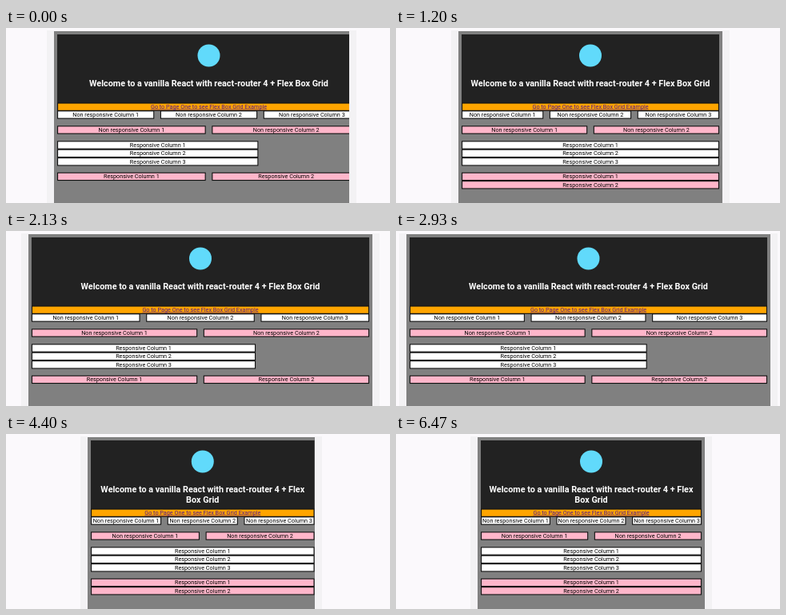
Recreate the animation shown at these times as an HTML page with a canvas. Size 480 by 219 pixels, loop 6.54 s.

```html
<!DOCTYPE html>
<html lang="en">
<head>
<meta charset="utf-8">
<title>Responsive grid</title>
<style>
  html, body { margin: 0; width: 100%; height: 100%; overflow: hidden; background: #fbf9fc; }
  canvas { display: block; width: 480px; height: 219px; }
</style>
</head>
<body>
<canvas id="stage"></canvas>
<script>
const WIDTH = 480, HEIGHT = 219, LOOP = 6540, STEP = 200 / 3;
const PADDING = 4, GAP = 7.6, BREAKPOINT = 346, LAYOUT_DELAY = 60;
const PINK = '#ffb6ca', WHITE = '#fff', INK = '#111';

// Window edges during the drag: [time, left, right]
const drag = [
  [-60, 51, 438], [0, 60, 429], [150, 71, 416], [300, 78, 408],
  [1200, 78, 408], [1470, 63, 422], [1600, 50, 436], [2130, 28, 458],
  [2930, 13, 468], [3350, 9, 472], [3530, 14, 468], [3667, 53, 436],
  [3800, 78, 410], [4130, 94, 394], [4400, 102, 386], [LOOP, 102, 386]
];

const canvas = document.getElementById('stage');
const ctx = canvas.getContext('2d');
const ratio = window.devicePixelRatio || 1;
canvas.width = WIDTH * ratio;
canvas.height = HEIGHT * ratio;
ctx.scale(ratio, ratio);

function edgesAt(time) {
  let i = 1;
  while (i < drag.length - 1 && drag[i][0] < time) i++;
  const [t0, l0, r0] = drag[i - 1], [t1, l1, r1] = drag[i];
  const k = Math.min(1, Math.max(0, (time - t0) / (t1 - t0)));
  return { left: l0 + (l1 - l0) * k, right: r0 + (r1 - r0) * k };
}

function innerWidth({ left, right }) {
  return right - left - 2 * PADDING;
}

function rect(x, y, w, h, color) {
  ctx.fillStyle = color;
  ctx.fillRect(x, y, w, h);
}

function text(label, x, baseline, color, font) {
  ctx.fillStyle = color;
  ctx.font = font || '7.25px Roboto, sans-serif';
  ctx.fillText(label, x, baseline);
}

function box(x, y, w, color, label) {
  rect(x, y, w, 10.4, INK);
  rect(x + 1.1, y + 1.1, w - 2.2, 8.2, color);
  if (label) text(label, x + w / 2, y + 7.5, '#000');
}

function columns(x, y, width, count, color, name) {
  const w = (width - GAP * (count - 1)) / count;
  for (let i = 0; i < count; i++) {
    box(x + i * (w + GAP), y, w, color, `${name} Column ${i + 1}`);
  }
}

function rows(x, y, width, count, color) {
  for (let i = 0; i < count; i++) {
    box(x, y + i * 10.4, width, color, `Responsive Column ${i + 1}`);
  }
}

function header(x, width) {
  const mid = x + width / 2;
  const font = 'bold 10.8px Roboto, sans-serif';
  const title = 'Welcome to a vanilla React with react-router 4 + Flex';
  rect(x, 8, width, 86, '#222');
  ctx.fillStyle = '#61dafb';
  ctx.beginPath();
  ctx.arc(mid, 34.5, 14, 0, Math.PI * 2);
  ctx.fill();
  if (width > 300) {
    text(title + ' Box Grid', mid, 73, WHITE, font);
  } else {
    text(title, mid, 73, WHITE, font);
    text('Box Grid', mid, 85.5, WHITE, font);
  }
}

function link(x, width) {
  const label = 'Go to Page One to see Flex Box Grid Example';
  const mid = x + width / 2;
  box(x, 93.5, width, '#ffa500');
  text(label, mid, 101, '#551a8b');
  const w = ctx.measureText(label).width;
  rect(mid - w / 2, 101.7, w, 0.6, '#551a8b');
}

function draw(time) {
  const edges = edgesAt(time);
  const { left, right } = edges;
  // The page reflows slightly after the window shrinks.
  const width = Math.max(innerWidth(edges), innerWidth(edgesAt(time - LAYOUT_DELAY)));
  const x = left + PADDING;
  const wide = width > BREAKPOINT;

  rect(0, 0, WIDTH, HEIGHT, '#fbf9fc');
  rect(left - 9, 3, right - left + 18, HEIGHT, '#f3f2f4');
  ctx.save();
  ctx.beginPath();
  ctx.rect(left, 4, right - left, HEIGHT);
  ctx.clip();
  rect(left, 4, right - left, HEIGHT, '#808080');
  ctx.textAlign = 'center';

  header(x, width);
  link(x, width);
  columns(x, 103.3, width, 3, WHITE, 'Non responsive');
  columns(x, 122.3, width, 2, PINK, 'Non responsive');
  rows(x, 141.3, wide ? (width * 2 - GAP / 2) / 3 : width, 3, WHITE);
  if (wide) columns(x, 180.7, width, 2, PINK, 'Responsive');
  else rows(x, 180.7, width, 2, PINK);
  ctx.restore();
}

const start = performance.now();
function tick() {
  const time = (performance.now() - start) % LOOP;
  draw(Math.floor((time + 4) / STEP) * STEP);
  requestAnimationFrame(tick);
}
tick();
</script>
</body>
</html>
```
